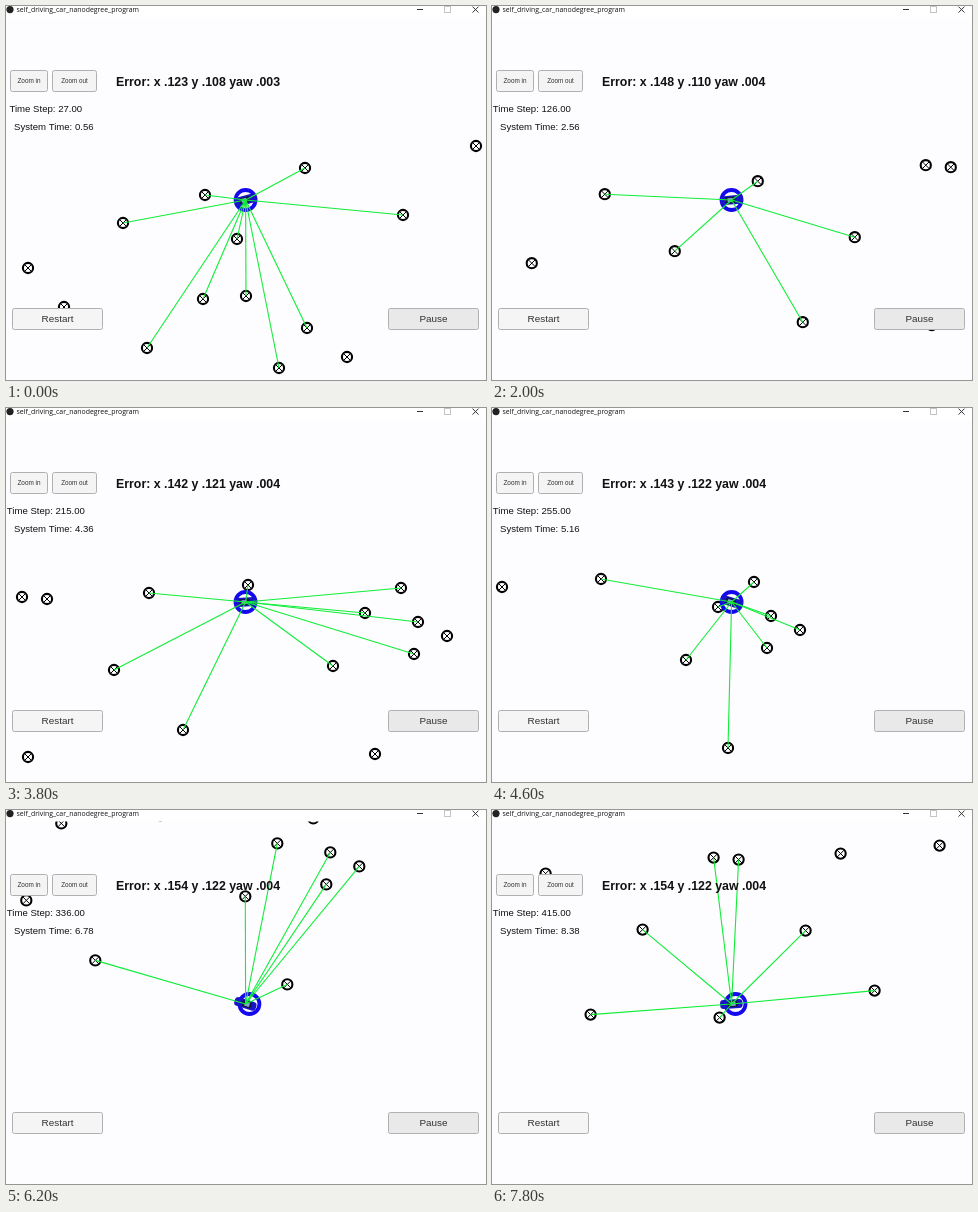
Recreate the animation shown at these times as an HTML page with a canvas. Size 480 px wide and 374 px high, loop 8 s.

```html
<!DOCTYPE html>
<html lang="en">
<head>
<meta charset="utf-8">
<title>Vehicle localization</title>
<style>
  html, body { margin: 0; width: 100%; height: 100%; overflow: hidden; background: #fdfcfe; }
  canvas { display: block; width: 480px; height: 374px; }
</style>
</head>
<body>
<canvas id="stage" width="480" height="374"></canvas>
<script>
const ctx = document.getElementById('stage').getContext('2d');
const LOOP = 8000, STEP = 200, SENSOR_RANGE = 182;
const CAR = { x: 239.6, y: 194 };
const SANS = '"Liberation Sans", Arial, sans-serif';

// the map, west to east
const landmarks = [
  [22, 262], [58, 301], [117, 217], [141, 342], [197, 293], [199, 189], [231, 233],
  [240, 290], [273, 362], [299, 162], [301, 322], [341, 351], [397, 209], [470, 140],
  [503, 343], [540, 197], [623, 127], [668, 268], [720, 183], [791, 111], [797, 271],
  [816, 113], [883, 184], [918, 107], [952, 244], [1017, 99], [1102, 180], [1134, 127],
  [1144, 268], [1170, 102], [1183, 168], [1187, 136], [1216, 150]
];

// drive east, U-turn, drive west: map offset and its velocity per step
const route = [
  { t: 0, x: 0, y: 0, vx: -24, vy: 6.4 },
  { t: 3800, x: -775, y: 78, vx: -46, vy: 3.3 },
  { t: 4600, x: -908, y: 72, vx: -28.8, vy: -9 },
  { t: 5400, x: -967, y: -28, vx: 7, vy: -31 },
  { t: 6200, x: -862.7, y: -93.6, vx: 31.5, vy: 10 },
  { t: 7800, x: -569.4, y: -63.4, vx: 40, vy: -3 }
];

function hermite(p0, v0, p1, v1, u) {
  const ease = u * u * (3 - 2 * u);
  return p0 + (p1 - p0) * ease + v0 * u * (1 - u) ** 2 - v1 * u * u * (1 - u);
}

function camera(t) {
  const i = Math.max(1, route.findIndex(key => key.t > t));
  const [a, b] = t >= route.at(-1).t ? route.slice(-2) : [route[i - 1], route[i]];
  const span = b.t - a.t, n = span / STEP, u = (t - a.t) / span;
  return {
    x: hermite(a.x, n * a.vx, b.x, n * b.vx, u),
    y: hermite(a.y, n * a.vy, b.y, n * b.vy, u)
  };
}

function readouts(t) {
  const system = .56 + t / 1000 + (t > 5400 ? .02 : 0);
  return {
    system,
    step: Math.round(49.6 * system - .77),
    x: .123 + .027 * (1 - Math.exp(-t / 1520)) + .0065 * Math.sin(2 * Math.PI * t / 5600),
    y: .1083 + .0137 / (1 + Math.exp((2900 - t) / 400)),
    yaw: .003 + .001 * Math.min(1, t / 1200)
  };
}

function line(x1, y1, x2, y2) {
  ctx.beginPath();
  ctx.moveTo(x1, y1);
  ctx.lineTo(x2, y2);
  ctx.stroke();
}

function circle(x, y, r) {
  ctx.beginPath();
  ctx.arc(x, y, r, 0, 2 * Math.PI);
}

function box(x, y, w, h, r, fill) {
  ctx.beginPath();
  ctx.roundRect(x, y, w, h, r);
  ctx.fillStyle = fill;
  ctx.fill();
}

function pen(color, width) {
  ctx.strokeStyle = color;
  ctx.lineWidth = width;
}

function cross(x, y, r) {
  line(x - r, y - r, x + r, y + r);
  line(x - r, y + r, x + r, y - r);
}

function text(str, x, y, font, align = 'center', color = '#111') {
  ctx.font = font;
  ctx.textAlign = align;
  ctx.fillStyle = color;
  ctx.fillText(str, x, y);
}

function button(label, x, y, w, h, size, fill) {
  box(x + .5, y + .5, w - 1, h - 1, 2, fill);
  pen('#b0b0b0', 1);
  ctx.stroke();
  text(label, x + w / 2, y + h / 2 + size * .32, `${size}px ${SANS}`, 'center', '#323232');
}

function drawLandmark({ x, y }) {
  circle(x, y, 5.1);
  ctx.fillStyle = '#fff';
  ctx.fill();
  pen('#000', 2.1);
  ctx.stroke();
  pen('#000', 1);
  cross(x, y, 3.5);
}

function drawCar(heading) {
  circle(241.5 - 2 * Math.cos(heading), CAR.y, 10);
  pen('#1408ee', 3.8);
  ctx.stroke();
  ctx.save();
  ctx.translate(CAR.x, CAR.y);
  ctx.rotate(heading);
  box(-11, -4.5, 22.5, 9, 3.5, '#1a14c8');
  box(-6, -3.2, 10, 6.4, 1, '#101848');
  box(-4, -2, 5, 4, 0, '#8c9cd8');
  ctx.restore();
}

function drawTitleBar() {
  box(0, 0, 480, 11.5, 0, '#fff');
  circle(4, 3.6, 3.6);
  ctx.fillStyle = '#222';
  ctx.fill();
  text('self_driving_car_nanodegree_program', 10.5, 5.8, '6.93px "Open Sans", sans-serif', 'left');
  pen('#333', 1);
  line(411, 3.5, 417, 3.5);
  cross(469.5, 3.6, 3);
  pen('#c4c4c4', 1);
  ctx.strokeRect(438.5, .5, 6, 6);
}

function drawPanel(t) {
  const { step, system, ...errors } = readouts(t);
  const [x, y, yaw] = Object.values(errors).map(v => v.toFixed(3).slice(1));
  button('Zoom in', 4, 64, 38, 22, 6.4, '#f4f4f4');
  button('Zoom out', 46, 64, 45, 22, 6.3, '#f4f4f4');
  button('Restart', 6, 302, 91, 22, 9.9, '#f5f5f5');
  button('Pause', 382, 302, 91, 22, 9.9, '#e9e9e9');
  text(`Error: x ${x} y ${y} yaw ${yaw}`, 110, 80.2, `bold 12.35px ${SANS}`, 'left');
  text(`Time Step: ${step}.00`, 39.8, 106.2, `9.6px ${SANS}`);
  text(`System Time: ${system.toFixed(2)}`, 47.8, 124, `9.6px ${SANS}`);
}

function draw(t) {
  const cam = camera(t), next = camera(t + 1);
  const heading = Math.atan2(cam.y - next.y, cam.x - next.x);
  const spots = landmarks.map(([x, y]) => ({ x: x + cam.x, y: y + cam.y }));

  box(0, 0, 480, 374, 0, '#fdfcfe');
  spots.forEach(drawLandmark);
  drawCar(heading);
  pen('#10ee38', 1.1);
  for (const { x, y } of spots) {
    if (Math.hypot(x - CAR.x, y - CAR.y) < SENSOR_RANGE) line(CAR.x, CAR.y, x, y);
  }
  drawPanel(t);
  drawTitleBar();
}

const start = performance.now();
function tick() {
  const t = (performance.now() - start) % LOOP;
  draw(Math.floor(t / STEP) * STEP);
  requestAnimationFrame(tick);
}
tick();
</script>
</body>
</html>
```
